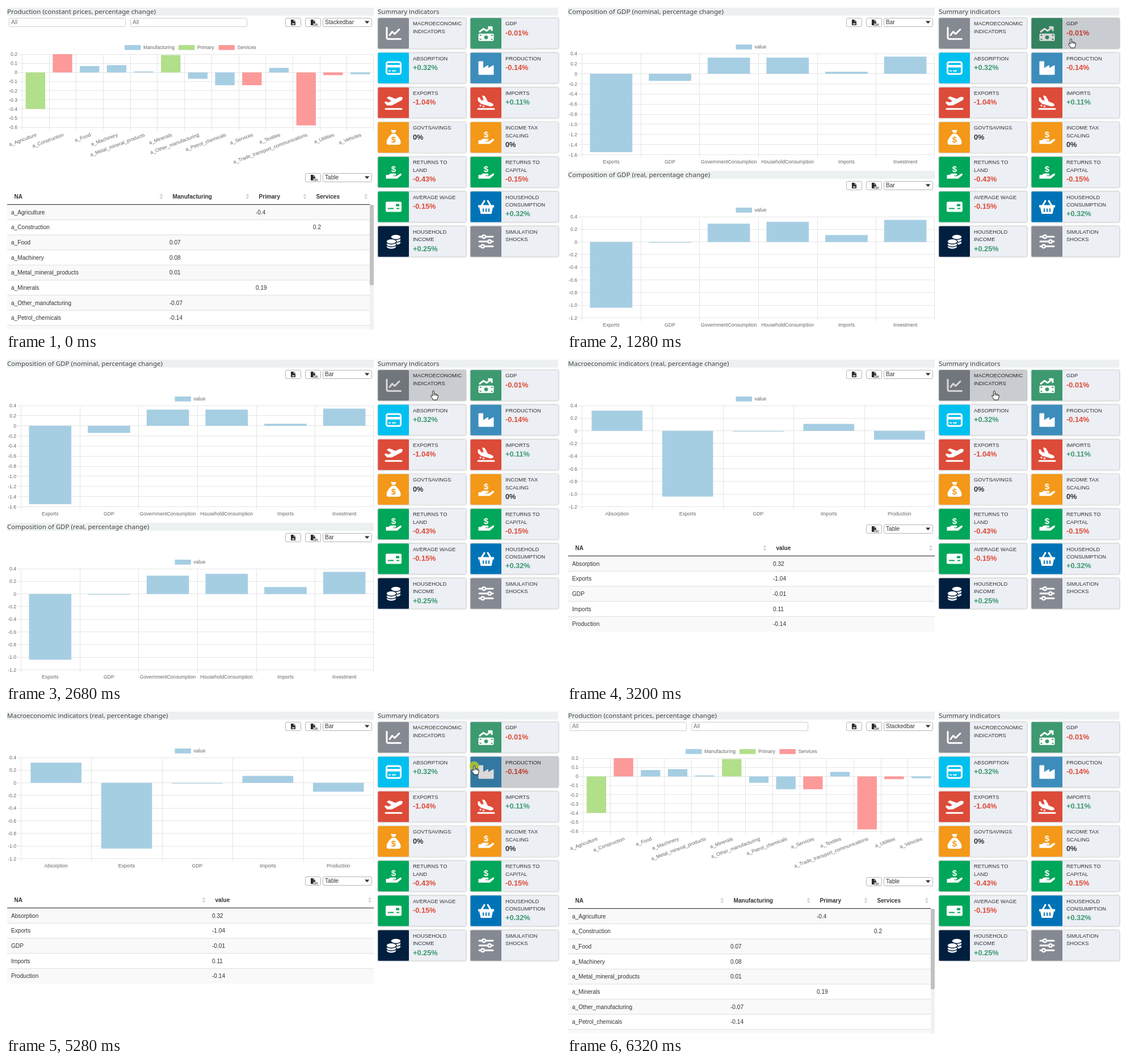
Write an HTML page that moves like this. It is 978 px wide and 572 px high and loops after 6880 ms.

```html
<!DOCTYPE html>
<html lang="en">
<head>
<meta charset="utf-8">
<title>Summary indicators</title>
<style>
  html, body { margin: 0; width: 100%; height: 100%; overflow: hidden; background: #fff; }
  svg { display: block; width: 978px; height: 572px; font: 10.1px "Liberation Sans", Arial, sans-serif; fill: #333; }
  .title { font: 11.52px "Noto Sans", sans-serif; fill: #444; }
  .axis { font-size: 8.7px; fill: #666; }
  .head { font-weight: bold; }
  .label { font-size: 9.35px; }
  .value { font-size: 12.75px; font-weight: bold; }
  .grid { stroke: #e5e5e5; fill: none; }
  .control { fill: #fff; stroke: #b4b4b4; }
  .tile { fill: #eceff4; filter: drop-shadow(0 0 .7px #0003) drop-shadow(0 .7px 1.4px #0005); }
  .icon { fill: #fff; }
  .line { fill: none; stroke: #fff; stroke-width: 3; stroke-linecap: round; stroke-linejoin: round; }
  .hole { fill: currentColor; }
  .cut { fill: none; stroke: currentColor; stroke-width: 2; }
  .dollar { font-weight: bold; font-size: 15px; text-anchor: middle; }
  .shade { fill: #000; opacity: 0; }
  .cursor { fill: #fff; stroke: #111; stroke-width: 1; stroke-linejoin: round; }
</style>
</head>
<body>
<svg id="stage" viewBox="0 0 978 572"></svg>
<script>
const LOOP = 6880, STEP = 40;
const BLUE = '#a6cee3', GREEN = '#b2df8a', PINK = '#fb9a99';

const text = (x, y, s, cls = '', more = '') => `<text x="${x}" y="${y}" class="${cls}" ${more}>${s}</text>`;
const rect = (x, y, w, h, more = '') => `<rect x="${x}" y="${y}" width="${w}" height="${h}" ${more}/>`;
const circle = (x, y, r, more = '') => `<circle cx="${x}" cy="${y}" r="${r}" ${more}/>`;
const path = (d, more = '') => `<path d="${d}" ${more}/>`;
const line = d => path(d, 'class="line"');
const cut = d => path(d, 'class="cut"');

const title = (x, y, w, s) => rect(x, y + 3, w, 14, 'fill="#ecf0f1"') + text(x, y + 14.4, s, 'title');

// Toolbar
const control = (x, y, w) => rect(x + .5, y + .5, w, 15, 'rx="2" class="control"');
function fileButton(x, y, csv) {
  return control(x, y, 27) + `<g transform="translate(${x + 14} ${y + 8})">` +
    path('M-4-5H1L4-2V5H-4Z', 'fill="#2b2b2b"') + path('M1-5V-2H4', 'stroke="#fff" fill="none" stroke-width=".8"') +
    (csv ? rect(0, 1.5, 8, 4.5, 'fill="#fff"') + text(-.5, 6, 'CSV', 'head', 'style="font-size:4.5px"')
         : path('M-2.5 3.5L-1 1L.3 2.3L1.3 .8L2.8 3.5Z', 'fill="#fff"')) + '</g>';
}
function toolbar(y, kind, image = true) {
  return (image ? fileButton(492, y, false) : '') + fileButton(527, y, true) + control(558, y, 86) +
    text(562, y + 11.2, kind) + path(`M632 ${y + 5.5}h8.4l-4.2 4.8Z`);
}
const filter = x => rect(x + .5, 21.5, 205, 15, 'rx="2" fill="#fff" stroke="#ccc"') + text(x + 4, 32.2, 'All', '', 'fill="#777"');

// Charts
const legend = (x, y, name, color) => rect(x, y, 28.5, 8.7, `fill="${color}"`) + text(x + 33, y + 7, name, 'axis');

function chart({ left, top, bottom, max, min, step, items, slanted }) {
  const right = 648, slot = (right - left) / items.length, unit = (bottom - top) / (max - min);
  const yOf = v => top + (max - v) * unit;
  let grid = '', out = '';
  for (let k = 0; k <= Math.round((max - min) / step); k++) {
    const v = +(max - k * step).toFixed(1), y = yOf(v);
    grid += `M${left - 6} ${Math.floor(y) + .5}H${right}`;
    out += text(left - 8, y + 3, v ? v.toFixed(1) : '0', 'axis', 'text-anchor="end"');
  }
  for (let i = 0; i <= items.length; i++)
    grid += `M${Math.min(Math.round(left + i * slot) + .5, 647.5)} ${top}V${bottom + 6}`;
  items.forEach(([name, v, color = BLUE], i) => {
    const mid = left + (i + .5) * slot, width = slot * .72;
    out += rect(mid - width / 2, yOf(Math.max(v, 0)), width, Math.abs(v) * unit, `fill="${color}"`);
    out += slanted
      ? text(0, 0, 'a_' + name, 'axis', `text-anchor="end" transform="translate(${mid + 2.7} ${bottom + 15.6}) rotate(-20.6)"`)
      : text(mid, bottom + 15.6, name, 'axis', 'text-anchor="middle"');
  });
  return path(grid, 'class="grid"') + out;
}

// Tables
const sorter = (x, y) => path(`M${x - 3} ${y - 1}h6l-3-4ZM${x - 3} ${y + 1}h6l-3 4Z`, 'fill="#d0d0d0"');

function table({ y, width, columns, rows }) {
  const pitch = 26.65;
  let out = '';
  rows.forEach((cells, i) => {
    const rowY = y + i * pitch;
    if (i % 2 === 0) out += rect(2, rowY, width, pitch, 'fill="#f9f9f9"');
    if (i) out += rect(2, rowY - .5, width, 1, 'fill="#dedede"');
    cells.forEach((cell, c) => out += text(columns[c].x, rowY + 17, cell));
  });
  columns.forEach(c => out += text(c.x + 5.5, y - 11, c.name, 'head') + sorter(c.sort, y - 14.5));
  return out + rect(2, Math.round(y) - 1, width, 1, 'fill="#222"');
}

// Pages
const sectors = [
  ['Agriculture', -.4, GREEN], ['Construction', .2, PINK], ['Food', .07], ['Machinery', .08],
  ['Metal_mineral_products', .01], ['Minerals', .19, GREEN], ['Other_manufacturing', -.07],
  ['Petrol_chemicals', -.14], ['Services', -.14, PINK], ['Textiles', .05],
  ['Trade_transport_communications', -.58, PINK], ['Utilities', -.03, PINK], ['Vehicles', -.02]
];
const macro = [['Absorption', .32], ['Exports', -1.04], ['GDP', -.01], ['Imports', .11], ['Production', -.14]];
const gdpParts = ['Exports', 'GDP', 'GovernmentConsumption', 'HouseholdConsumption', 'Imports', 'Investment'];
const gdpItems = values => gdpParts.map((name, i) => [name, values[i]]);

const production = title(2, 0, 646, 'Production (constant prices, percentage change)') +
  filter(5) + filter(219) + toolbar(21, 'Stackedbar') +
  legend(209, 69, 'Manufacturing', BLUE) + legend(304, 69, 'Primary', GREEN) + legend(374.5, 69, 'Services', PINK) +
  chart({ left: 28, top: 85, bottom: 214, max: .2, min: -.6, step: .1, items: sectors, slanted: true }) +
  toolbar(295, 'Table', false) +
  table({
    y: 350.7, width: 639,
    columns: [{ name: 'NA', x: 9, sort: 273.5 }, { name: 'Manufacturing', x: 288, sort: 425.5 },
      { name: 'Primary', x: 440, sort: 526.5 }, { name: 'Services', x: 541, sort: 634 }],
    rows: sectors.slice(0, 9).map(([name, v, color = BLUE]) =>
      ['a_' + name, ...[BLUE, GREEN, PINK].map(c => c === color ? v : '')])
  }) +
  rect(641, 351, 7, 220, 'fill="#f1f1f1"') + rect(641, 351, 7, 142, 'rx="2" fill="#c1c1c1"') +
  rect(0, 571, 650, 1, 'fill="#fff"');

const gdp = [
  ['nominal', 0, -1.6, [-1.55, -.14, .32, .32, .04, .34]],
  ['real', 288, -1.2, [-1.04, -.01, .29, .32, .11, .35]]
].map(([kind, y, min, values]) =>
  title(2, y, 646, `Composition of GDP (${kind}, percentage change)`) + toolbar(y + 21, 'Bar') +
  legend(297.5, y + 68, 'value', BLUE) +
  chart({ left: 26, top: y + 84, bottom: y + 262.5, max: .4, min, step: .2, items: gdpItems(values) })).join('');

const indicators = title(2, 0, 646, 'Macroeconomic indicators (real, percentage change)') +
  toolbar(21, 'Bar') + legend(297.5, 68, 'value', BLUE) +
  chart({ left: 26, top: 84, bottom: 262.5, max: .4, min: -1.2, step: .2, items: macro }) +
  toolbar(294, 'Table', false) +
  table({
    y: 349.7, width: 646,
    columns: [{ name: 'NA', x: 9, sort: 348.5 }, { name: 'value', x: 363, sort: 641 }],
    rows: macro
  });

// Tile icons, centred on the origin
const coin = (x, y) => `<ellipse cx="${x}" cy="${y}" rx="9" ry="4.4" stroke="currentColor" stroke-width="1.4"/>`;
const knob = (x, y) => circle(x, y, 4) + circle(x, y, 1.5, 'class="hole"');
const runway = line('M-14 11H14');
const icons = {
  chart: line('M-12-10V7Q-12 10-9 10H12.5M-7 3L-2.5-3L2 1L10-7'),
  trend: line('M-11-3L-4.5-8L1-4.5L9-10.5M4.5-11H10V-5.5') + rect(-13.5, .5, 27, 13, 'rx="2"') +
    circle(0, 7, 3.4, 'class="hole"') + cut('M-11.5 3.5h3M8.5 3.5h3M-11.5 10.5h3M8.5 10.5h3'),
  card: rect(-12.5, -10.5, 25, 21, 'rx="3" class="line"') + path('M-13-5.5H13V-1H-13ZM-9 4h4v2h-4ZM-3 4h7v2h-7Z'),
  factory: path('M-13.5-11q0-1 1-1h6.5q1 0 1 1V0L2-4.5Q4-5.5 4-4V0L11.5-4.5Q13.5-5.5 13.5-4V11q0 1-1 1H-12.5q-1 0-1-1Z'),
  departure: path('M-12 4.3Q-11.5 4.8-10.8 4.8H-4.2Q-3.4 4.8-2.7 4.4L11.8-3Q14-4.1 15.1-5.9C17-9 15.5-10.3 12.8-10.4' +
    'C11-10.5 9.8-10 8.5-9.4L3.6-6.9L-7.3-11Q-7.8-11.2-8.2-11L-11.5-9.4Q-12.3-8.7-11.7-8L-3.9-3.1L-9.1-.5' +
    'L-12.7-2.3Q-13.1-2.5-13.5-2.3L-15.5-1.3Q-16.2-.7-15.8 .1Z') + runway,
  arrival: path('M-13.8-2.5L-9.3 1.5Q-8.8 2-8 2.2L6.3 6.1C7.7 6.5 9 6.5 10.4 6.2C13.5 5.3 13.6 3.3 11.6 1.6' +
    'Q10.2 .2 8-.4L3.2-1.7L-1.9-11.3Q-2.1-11.7-2.4-11.9L-5.7-12.8Q-6.7-12.7-6.7-12L-4.3-3.7L-9.4-5.1' +
    'L-10.8-8.5Q-11-8.9-11.4-9L-13.4-9.6Q-14.4-9.5-14.4-8.8V-3.7Z') + circle(-10, 5, 1.6) + circle(-4.5, 6.5, 1.6) + runway,
  sack: path('M-5-13H5L2.5-8H-2.5ZM-3-6.5H3C8-2 12.5 4 12.5 9q0 4-4 4H-8.5q-4 0-4-4C-12.5 4-8-2-3-6.5Z') +
    text(0, 8.5, '$', 'dollar hole'),
  hand: text(0, -.5, '$', 'dollar') +
    path('M-13.5 5H-9L-6 2.5H2.5C5 2.5 5 5.7 2.5 6H-1V7H5L11 3C14 1.5 15 4 13 6L6.5 11.5H-13.5Z'),
  cheque: rect(-14, -9, 28, 18, 'rx="2.5"') + cut('M-10 3H0M5 3H10') + rect(4, -5, 6, 4, 'class="hole"'),
  basket: line('M-8-2L-3-10.5M8-2L3-10.5') + path('M-14-3H14V1H12L9.5 12.5H-9.5L-12 1H-14Z') + cut('M-5 3V9M0 3V9M5 3V9'),
  coins: [[4, 2], [4, -3], [4, -8], [-4, 9], [-4, 5], [-4, 0]].map(p => coin(...p)).join(''),
  sliders: line('M-12-8.5H12M-12 0H12M-12 8.5H12') + knob(-4, -8.5) + knob(6, 0) + knob(-6, 8.5)
};

const tiles = [
  ['chart', '#858992', 'MACROECONOMIC|INDICATORS'], ['trend', '#3d9970', 'GDP', '-0.01%'],
  ['card', '#00c0ef', 'ABSORPTION', '+0.32%'], ['factory', '#3c8dbc', 'PRODUCTION', '-0.14%'],
  ['departure', '#dd4b39', 'EXPORTS', '-1.04%'], ['arrival', '#dd4b39', 'IMPORTS', '+0.11%'],
  ['sack', '#f39819', 'GOVTSAVINGS', '0%'], ['hand', '#f39819', 'INCOME TAX|SCALING', '0%'],
  ['hand', '#00a65a', 'RETURNS TO|LAND', '-0.43%'], ['hand', '#00a65a', 'RETURNS TO|CAPITAL', '-0.15%'],
  ['cheque', '#00a65a', 'AVERAGE WAGE', '-0.15%'], ['basket', '#0073b7', 'HOUSEHOLD|CONSUMPTION', '+0.32%'],
  ['coins', '#001f3f', 'HOUSEHOLD|INCOME', '+0.25%'], ['sliders', '#858992', 'SIMULATION|SHOCKS']
];
const TILE_W = 155, TILE_H = 54;
const tileX = i => i % 2 ? 818.5 : 655.5;
const tileY = i => 21.3 + Math.floor(i / 2) * 61.25;
const valueColor = { '+': '#3d9970', '-': '#dd4b39' };

function tile([icon, color, label, value = ''], i) {
  const lines = label.split('|');
  return `<g transform="translate(${tileX(i)} ${tileY(i)})">` +
    rect(0, 0, TILE_W, TILE_H, 'rx="1.5" class="tile"') +
    rect(0, 0, 54.5, TILE_H, `rx="1.5" fill="${color}"`) +
    `<g class="icon" color="${color}" transform="translate(27.5 27)">${icons[icon]}</g>` +
    lines.map((s, k) => text(61.5, 13.1 + k * 13.6, s, 'label')).join('') +
    text(61.5, 17.3 + lines.length * 13.3, value, 'value', `fill="${valueColor[value[0]] || '#333'}"`) +
    rect(0, 0, TILE_W, TILE_H, 'rx="1.5" class="shade"') + '</g>';
}

const group = (id, body) => `<g id="${id}">${body}</g>`;
const stage = document.getElementById('stage');
stage.innerHTML = group('production', production) + group('gdp', gdp) + group('indicators', indicators) +
  title(655, 0, 318, 'Summary indicators') + tiles.map(tile).join('') +
  group('pointer',
    circle(0, 1, 8.5, 'id="click" fill="#c3d21f" opacity=".75"') +
    path('M0 0V12L2.8 9.4L4.9 14L6.8 13.2L4.8 8.7H8.6Z', 'id="arrow" class="cursor"') +
    path('M-1.3 1.2C-1.3-.4 1.3-.4 1.3 1.2V5.5C1.8 4.6 3.8 4.8 3.9 6.2C4.6 5.4 6.1 5.8 6.2 7C7 6.4 8.2 6.9 8.2 8.2V10.5' +
      'C8.2 13 6.8 13.5 6.8 16H-.4C-.6 14-4 11-4.3 9C-4.3 7.8-2.6 7.6-1.3 9.3ZM1.3 5.5V8.5M3.9 6.2V8.5M6.2 7V9',
      'id="hand" class="cursor"'));

const $ = id => document.getElementById(id);
const shades = stage.querySelectorAll('.shade');
const show = (id, on) => $(id).style.display = on ? '' : 'none';

// Pointer path: time, x, y
const route = [
  [40, 978, 66], [400, 918, 60], [760, 888, 58], [1640, 888, 58], [2200, 811.5, 58], [2320, 786, 58],
  [2360, 786, 58], [2680, 753, 58], [3960, 753, 58], [4400, 806, 88], [4600, 825, 98], [LOOP, 825, 98]
];
const clicks = [[1160, 1280], [3080, 3200], [5280, 5400]];

function pointerAt(t) {
  const i = Math.max(1, route.findIndex(p => p[0] >= t));
  const [t0, x0, y0] = route[i - 1], [t1, x1, y1] = route[i];
  const k = (t - t0) / (t1 - t0);
  return [x0 + (x1 - x0) * k, y0 + (y1 - y0) * k];
}

function draw(now) {
  const t = Math.floor(now % LOOP / STEP) * STEP;
  const page = t < 1280 || t >= 5400 ? 'production' : t < 3200 ? 'gdp' : 'indicators';
  for (const id of ['production', 'gdp', 'indicators']) show(id, id === page);

  const [x, y] = pointerAt(t);
  const presence = t < 80 ? 0 : Math.max(0, Math.min(1, (6320 - t) / 160));
  let hovering = false;
  shades.forEach((shade, i) => {
    const dx = x - tileX(i), dy = y - tileY(i);
    const inside = dx >= 0 && dx <= TILE_W && dy >= 0 && dy <= TILE_H;
    hovering ||= inside;
    shade.style.opacity = inside ? .15 * presence : 0;
  });
  $('pointer').setAttribute('transform', `translate(${x} ${y})`);
  $('pointer').style.opacity = presence;
  show('hand', hovering);
  show('arrow', !hovering);
  show('click', clicks.some(([from, to]) => t >= from && t < to));
}

const start = performance.now();
function tick() {
  draw(performance.now() - start);
  requestAnimationFrame(tick);
}
tick();
</script>
</body>
</html>
```
